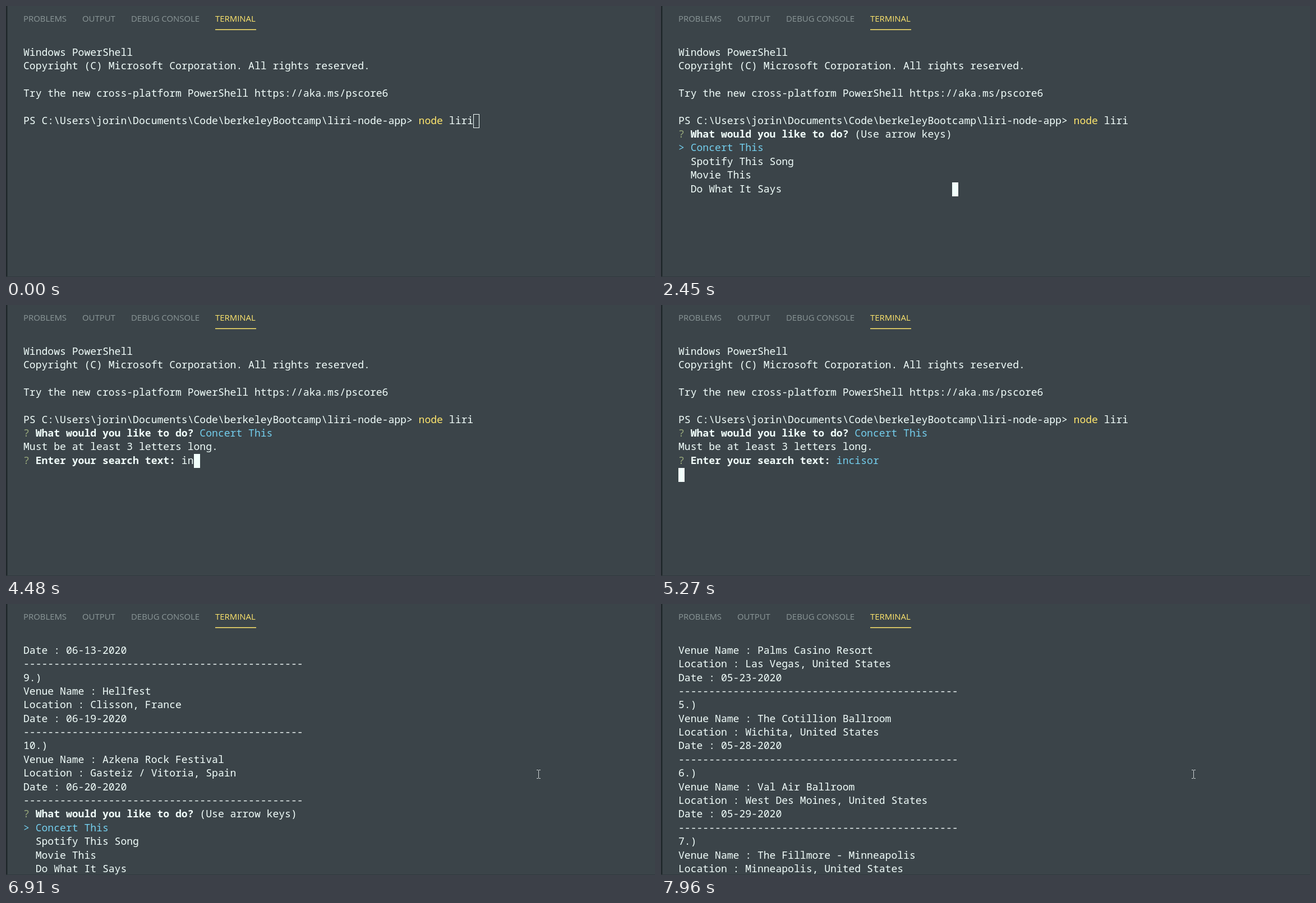
An HTML page with a canvas that plays this animation: 1157 px wide and 484 px high, repeating every 8 s.

```html
<!DOCTYPE html>
<html lang="en">
<head>
<meta charset="utf-8">
<title>Terminal session</title>
<style>
  html, body { margin: 0; width: 100%; height: 100%; overflow: hidden; background: #3b4449; }
  canvas { display: block; }
</style>
</head>
<body>
<canvas id="stage" width="1157" height="484"></canvas>
<script>
const ctx = document.getElementById("stage").getContext("2d");
const LOOP = 8000;
const ROWS = 17;
const LEFT = 31, TOP = 71.2, CELL_W = 10.84, CELL_H = 24.38, BASELINE = 17.6;
const MONO = (CELL_W / 0.6) + 'px "Noto Sans Mono", monospace';
const UI = '14.9px "Open Sans", sans-serif';
const COLOR = {
  back: "#3b4449", edge: "#1f272a", rule: "#30393d", text: "#f2fffc",
  tab: "#8b9798", yellow: "#ffe66d", cyan: "#74cfee", green: "#98a97c"
};

const run = (text, color = COLOR.text, bold = false) => ({ text, color, bold });
const ask = (question, ...rest) =>
  [run("? ", COLOR.green), run(question + " ", COLOR.text, true), ...rest];
const plain = text => [run(text)];

const command = [
  run("PS C:\\Users\\jorin\\Documents\\Code\\berkeleyBootcamp\\liri-node-app> "),
  run("node", COLOR.yellow), run(" liri")
];
const intro = [
  plain("Windows PowerShell"),
  plain("Copyright (C) Microsoft Corporation. All rights reserved."),
  [],
  plain("Try the new cross-platform PowerShell https://aka.ms/pscore6"),
  [],
  command
];
const question = "What would you like to do?";
const menu = [
  ask(question, run("(Use arrow keys)")),
  [run("> Concert This", COLOR.cyan)],
  plain("  Spotify This Song"),
  plain("  Movie This"),
  plain("  Do What It Says")
];
const search = (typed, color) => [
  ...intro,
  ask(question, run("Concert This", COLOR.cyan)),
  plain("Must be at least 3 letters long."),
  ask("Enter your search text:", run(typed, color))
];

const FIRST = 4;
const dashes = plain("-".repeat(46));
const shows = [
  ["Palms Casino Resort", "Las Vegas, United States", "05-23"],
  ["The Cotillion Ballroom", "Wichita, United States", "05-28"],
  ["Val Air Ballroom", "West Des Moines, United States", "05-29"],
  ["The Fillmore - Minneapolis", "Minneapolis, United States", "05-30"],
  ["I-Days Festival", "Rho, Italy", "06-13"],
  ["Hellfest", "Clisson, France", "06-19"],
  ["Azkena Rock Festival", "Gasteiz / Vitoria, Spain", "06-20"]
];
const log = shows.flatMap(([venue, place, day], i) => [
  dashes,
  plain(`${FIRST + i}.)`),
  plain(`Venue Name : ${venue}`),
  plain(`Location : ${place}`),
  plain(`Date : ${day}-2020`)
]).concat([dashes], menu);
const view = top => log.slice(top, top + ROWS);

// Each step holds until the next; cursor is [row, column].
const steps = [
  { at: 0, lines: intro, cursor: [5, 74], hollow: true },
  { at: 420, lines: intro, cursor: [5, 74] },
  { at: 1240, lines: intro, cursor: [6, 0] },
  { at: 2450, lines: [...intro, ...menu], cursor: [10, 45] },
  { at: 3250, lines: search(""), cursor: [8, 26] },
  { at: 4480, lines: search("in"), cursor: [8, 28] },
  { at: 4680, lines: search("inc"), cursor: [8, 0] },
  { at: 4880, lines: search("incis"), cursor: [8, 31] },
  { at: 5080, lines: search("incisor"), cursor: [8, 33] },
  { at: 5270, lines: search("incisor", COLOR.cyan), cursor: [9, 0] },
  { at: 5690, lines: view(0), cursor: [16, 3] },
  { at: 5930, lines: view(24) },
  { at: 6910, lines: view(24), mouse: true },
  { at: 7520, lines: view(12), mouse: true },
  { at: 7760, lines: view(6), mouse: true },
  { at: 7960, lines: view(2), mouse: true }
];

function rect(color, x, y, w, h) {
  ctx.fillStyle = color;
  ctx.fillRect(x, y, w, h);
}

function glyph(ch, row, col, color, bold) {
  ctx.font = (bold ? "bold " : "") + MONO;
  ctx.fillStyle = color;
  ctx.fillText(ch, LEFT + col * CELL_W, Math.round(TOP + BASELINE + row * CELL_H));
}

function drawLine(runs, row) {
  let col = 0;
  for (const { text, color, bold } of runs) {
    for (const ch of text) glyph(ch, row, col++, color, bold);
  }
}

function drawCursor({ lines, cursor: [row, col], hollow }) {
  const x = Math.round(LEFT + col * CELL_W);
  const y = Math.round(TOP + row * CELL_H);
  if (hollow) {
    ctx.strokeStyle = COLOR.text;
    ctx.lineWidth = 1;
    ctx.strokeRect(x + 0.5, y + 0.5, 10, 24);
    return;
  }
  rect(COLOR.text, x, y, 11, 25);
  const under = (lines[row] || []).map(r => r.text).join("")[col];
  if (under) glyph(under, row, col, COLOR.back, false);
}

function drawMouse() {
  const color = "#ccd2d3";
  rect(color, 949, 297, 1, 14);
  for (const y of [296, 311]) {
    rect(color, 946, y, 3, 1);
    rect(color, 950, y, 3, 1);
  }
}

function drawPanel() {
  rect(COLOR.back, 0, 0, 1157, 484);
  rect(COLOR.edge, 0, 0, 2.5, 484);
  rect(COLOR.rule, 0, 483, 1157, 1);
  ctx.font = UI;
  const tabs = [["PROBLEMS", 31], ["OUTPUT", 136], ["DEBUG CONSOLE", 223], ["TERMINAL", 373]];
  for (const [name, x] of tabs) {
    ctx.fillStyle = name === "TERMINAL" ? COLOR.yellow : COLOR.tab;
    ctx.fillText(name, x, 28);
  }
  rect(COLOR.yellow, 373, 41.5, 73, 1.5);
}

function draw() {
  const time = performance.now() % LOOP;
  const step = steps.filter(s => s.at <= time).pop();
  drawPanel();
  step.lines.forEach(drawLine);
  if (step.cursor) drawCursor(step);
  if (step.mouse) drawMouse();
  requestAnimationFrame(draw);
}
draw();
</script>
</body>
</html>
```
